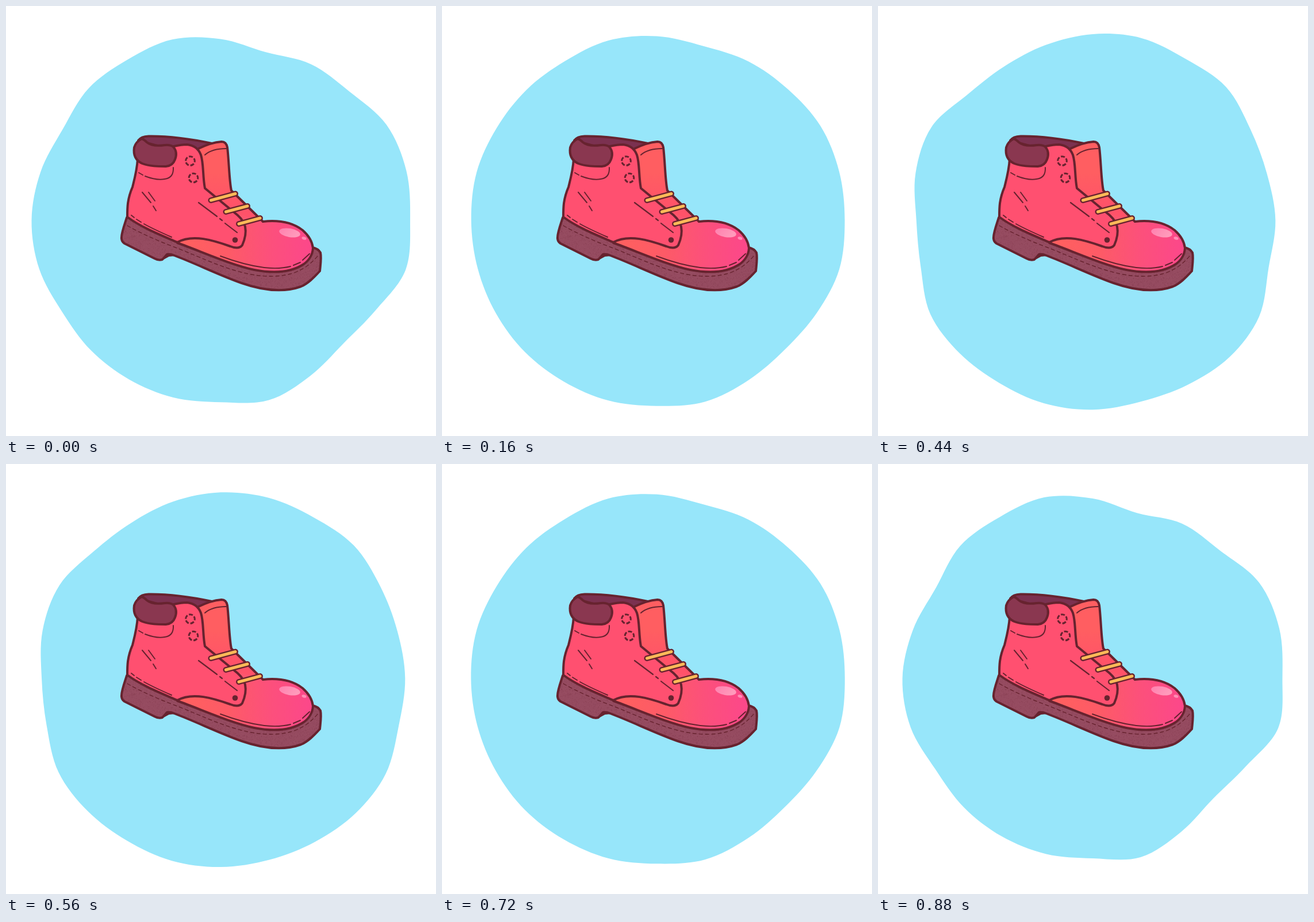
An HTML page with a canvas that plays this animation: 748 px wide and 748 px high, repeating every 0.96 s.

```html
<!DOCTYPE html>
<html lang="en">
<head>
<meta charset="utf-8">
<title>Boot on a wobbling blob</title>
<style>
  html, body { margin: 0; width: 100%; height: 100%; overflow: hidden; background: #fff; }
  canvas { display: block; width: 748px; height: 748px; }
</style>
</head>
<body>
<canvas id="stage" width="748" height="748"></canvas>
<script>
const SIZE = 748, LOOP = 960, STEP = 40, LAST_POSE = 880;
const INK = '#67232f';
const CENTER = { x: 373.5, y: 373 };
const stage = document.getElementById('stage').getContext('2d');

// Blob radius at equal angles, clockwise from the right, in its two extreme poses.
const notched = [330, 334, 307, 296, 308, 322, 313, 316, 317, 317, 316, 328,
  331, 324, 315, 326, 324, 326, 313, 298, 311, 314, 334, 336];
const tilted = [318, 317, 334, 336, 330, 326, 329, 329, 326, 327, 326, 310,
  307, 319, 324, 309, 309, 316, 324, 328, 324, 328, 317, 314];

// Rises steadily to just past the tilted pose, then falls back faster.
const morphAt = t => Math.min(.13 + t / 500, (LAST_POSE - t) / 370, 1.04);

function blobPath(morph) {
  const n = notched.length;
  const bulge = 10 * Math.max(0, morph * (1 - morph));
  const points = notched.map((radius, i) => {
    const r = radius + (tilted[i] - radius) * morph + bulge;
    const angle = i / n * Math.PI * 2;
    return [CENTER.x + r * Math.cos(angle), CENTER.y + r * Math.sin(angle)];
  });
  const path = new Path2D();
  path.moveTo(...points[0]);
  for (let i = 0; i < n; i++) {
    const [p, a, b, q] = [-1, 0, 1, 2].map(k => points[(i + k + n) % n]);
    path.bezierCurveTo(
      a[0] + (b[0] - p[0]) / 6, a[1] + (b[1] - p[1]) / 6,
      b[0] - (q[0] - a[0]) / 6, b[1] - (q[1] - a[1]) / 6, ...b);
  }
  return path;
}

function seeded(seed) {
  return () => (seed = (seed * 16807) % 2147483647) / 2147483647;
}

function paintBoot() {
  const canvas = document.createElement('canvas');
  canvas.width = canvas.height = SIZE;
  const c = canvas.getContext('2d');
  c.lineCap = c.lineJoin = 'round';

  const line = (d, width = 2, color = INK, dash = []) => {
    c.setLineDash(dash);
    c.lineWidth = width;
    c.strokeStyle = color;
    c.stroke(new Path2D(d));
    c.setLineDash([]);
  };
  const fill = (d, color) => {
    c.fillStyle = color;
    c.fill(new Path2D(d));
  };
  const shape = (d, color, width = 4) => {
    fill(d, color);
    line(d, width);
  };
  const ellipse = (x, y, rx, ry, turn, color) => {
    c.beginPath();
    c.ellipse(x, y, rx, ry, turn, 0, Math.PI * 2);
    c.fillStyle = color;
    c.fill();
  };
  const gradient = (x0, y0, x1, y1, ...colors) => {
    const g = c.createLinearGradient(x0, y0, x1, y1);
    colors.forEach((color, i) => g.addColorStop(i / (colors.length - 1), color));
    return g;
  };

  // Sole with a fine grain
  const sole = 'M210 368 C207 378 202 391 201 401 Q200 409 206 413 L258 439 Q265 443 272 441 ' +
    'L280 432 Q286 431 293 434 C330 448 375 470 410 482 C450 496 485 498 513 488 ' +
    'C525 483 535 473 546 461 C547 450 549 438 547 429 Q543 422 533 420 Z';
  fill(sole, '#954b60');
  c.save();
  c.clip(new Path2D(sole));
  const random = seeded(71);
  for (let i = 0; i < 9000; i++) {
    c.fillStyle = random() < .5 ? 'rgba(112,42,62,.25)' : 'rgba(176,100,120,.25)';
    c.fillRect(200 + random() * 350, 366 + random() * 132, 1, 1);
  }
  c.restore();
  line(sole, 4);
  shape('M272 441 L280 432 L293 434 L283 435 Z', INK, 2);
  line('M211 382 C235 396 270 411 300 422 C335 436 365 450 395 459 C430 470 465 474 495 466 ' +
    'C518 459 531 448 543 434', 1.4, INK, [6, 5]);

  // Lining, tongue and toe
  shape('M230 234 Q235 227 248 226.5 C285 226 325 232 358 239 L337 250 L296 252 Z', '#7b3150');
  const tongueEdge = 'M335 248 C347 242 362 237 375 236 Q383 236 385 246 C388 270 388 302 392 321 L447 375';
  fill(tongueEdge + ' L410 390 L344 317 Z', gradient(0, 290, 0, 350, '#ff5e61', '#ff5269'));
  const toeEdge = 'M447 375 C475 372 499 377 516 390 Q532 404 534 421 Q533 438 518 449 ' +
    'C495 464 463 465 432 459 C390 450 340 427 298 412';
  fill(toeEdge + ' C310 403 330 400 352 405 L405 362 Z',
    gradient(320, 0, 525, 0, '#ff5f60', '#fd5a67', '#fc507b', '#fc4889'));
  line(tongueEdge, 4);
  line(toeEdge, 4);

  // Quarter
  shape('M229 266 C228 285 223 303 220 315 C211 336 211 350 211 367 C235 385 268 398 298 411 ' +
    'C325 396 362 408 390 418 Q405 424 411 416 C415 407 418 394 416 384 Q414 374 403 364 ' +
    'L346 317 C342 296 344 274 339 259 Q333 243 315 241 Q305 241 292 244 L270 260 Z', '#ff5070');

  // Padded collar
  shape('M236 231 Q226 236 223 246 C221 260 226 269 237 274 C250 279 265 279 278 279 ' +
    'Q290 278 294 267 Q299 254 291 245 Q286 241 276 242 C262 244 252 243 245 237 Q240 232 236 231 Z',
    '#8a3750');

  // Seams and scuffs
  line('M231 290 L238 294 M242 296 C255 301 266 303 276 301 Q292 299 291 281');
  line('M237 324 L252 342 M256 348 L261 356 M248 324 L259 339');
  line('M218 364 L223 368 M227 371 L235 376 M240 379 C256 388 272 395 288 402');
  line('M335 342 L367 366 M372 370 L376 373 M381 378 L402 394', 2.2);
  line('M373 435 C397 444 425 452 449 455 Q475 458 495 453 M500 451 L512 446 M516 442 L528 431');
  line('M346 259 C355 251 367 248 383 248');
  ellipse(398.5, 407, 4.8, 4.8, 0, INK);

  // Eyelets: rings of five dashes
  c.lineCap = 'butt';
  for (const [x, y] of [[320.5, 269.5], [326, 299]]) {
    line(`M${x - 7.8} ${y} a7.8 7.8 0 1 1 15.6 0 a7.8 7.8 0 1 1 -15.6 0`, 3, INK, [7, 2.8]);
  }
  c.lineCap = 'round';

  // Laces
  for (const d of ['M356.5 338 L399 326.5', 'M382.5 358 L420 348', 'M405 379 L442 369']) {
    line(d, 10);
    line(d, 5, '#fcba58');
  }

  // Shine
  ellipse(493.5, 394.5, 18.5, 7.5, .17, gradient(480, 386, 500, 404, '#ff83b0', '#ff9abb'));
  ellipse(518.5, 404, 4.2, 2.5, .3, '#ff8db5');
  return canvas;
}

const boot = paintBoot();

function frame(now) {
  const t = Math.min(Math.floor((now % LOOP) / STEP) * STEP, LAST_POSE);
  stage.fillStyle = '#fff';
  stage.fillRect(0, 0, SIZE, SIZE);
  stage.fillStyle = '#97e6fa';
  stage.fill(blobPath(morphAt(t)));
  stage.drawImage(boot, 0, 0);
  requestAnimationFrame(frame);
}

frame(0);
</script>
</body>
</html>
```
